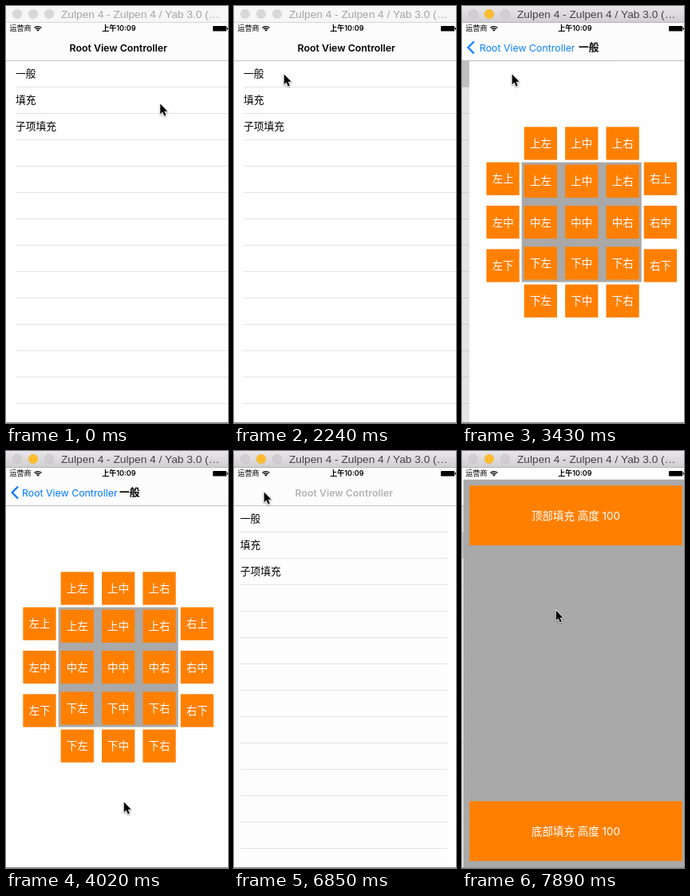
An HTML page with a canvas that plays this animation: 278x522 px, repeating every 8 s.

```html
<!DOCTYPE html>
<html lang="zh-CN">
<head>
<meta charset="utf-8">
<style>
html, body { margin: 0; width: 278px; height: 522px; overflow: hidden; background: #fff; }
canvas { display: block; width: 278px; height: 522px; }
</style>
</head>
<body>
<canvas id="stage"></canvas>
<script>
const W = 278, H = 522, LOOP = 8000, STEP = 148.9;
const SCREEN = { w: 281.25, top: 20.75, bottom: 521, nav: 68 };
const MID = SCREEN.w / 2, ROW = 33;
const SANS = 'Inter, "Noto Sans CJK SC", "Noto Sans CJK", sans-serif';
const TITLE_FONT = '"Liberation Sans", Arial, sans-serif';
const ORANGE = '#ff8000', GRAY = '#a9a9a9', BLUE = '#007aff';
const TAP = { open: 2970, back: 6545, fill: 7435 };

const canvas = document.getElementById('stage');
const dpr = window.devicePixelRatio || 1;
canvas.width = W * dpr;
canvas.height = H * dpr;
const ctx = canvas.getContext('2d');

const START = [192.5, 121];
const moves = [
  { from: 0, to: 890, at: [121, 136], via: [135, 205] },
  { from: 1490, to: 2240, at: [62, 84] },
  { from: 3430, to: 4020, at: [147, 438] },
  { from: 4620, to: 5070, at: [57, 114] },
  { from: 5220, to: 5780, at: [37, 50] },
  { from: 6850, to: 7450, at: [110, 118] },
  { from: 7600, to: 7890, at: [117, 198] }
];

const clamp = v => Math.max(0, Math.min(1, v));
const easeOut = k => 1 - (1 - k) ** 2;
const mix = (a, b, k) => a + (b - a) * k;

function pointerAt(t) {
  let pos = START;
  for (const { from, to, at, via } of moves) {
    if (t < from) break;
    const k = easeOut(clamp((t - from) / (to - from)));
    pos = pos.map((a, i) => via
      ? mix(mix(a, via[i], k), mix(via[i], at[i], k), k)
      : mix(a, at[i], k));
  }
  return pos;
}

// Critically damped slide
function slide(t, start) {
  const u = Math.max(0, t - start) * 0.016;
  const p = 1 - (1 + u) * Math.exp(-u);
  return p > 0.998 ? 1 : p;
}

function rect(x, y, w, h, color) {
  ctx.fillStyle = color;
  ctx.fillRect(x, y, w, h);
}

function shifted(x, paint) {
  ctx.save();
  ctx.translate(x, 0);
  paint();
  ctx.restore();
}

function text(s, x, cy, size, color, { weight = 400, align = 'left', font = SANS, alpha = 1 } = {}) {
  if (alpha <= 0) return;
  ctx.globalAlpha = alpha;
  ctx.font = `${weight} ${size}px ${font}`;
  ctx.textAlign = align;
  ctx.fillStyle = color;
  ctx.fillText(s, x, cy + size * 0.365);
  ctx.globalAlpha = 1;
}

function titleBar(active) {
  const g = ctx.createLinearGradient(0, 0, 0, 20);
  g.addColorStop(0, active ? '#e8e6e8' : '#f6f6f6');
  g.addColorStop(1, active ? '#d1cfd1' : '#f6f6f6');
  rect(0, 0, W, 20, g);
  rect(0, 20, W, 1, active ? '#b4b2b4' : '#d6d6d6');
  for (let i = 0; i < 3; i++) {
    const lit = active && i === 1;
    ctx.beginPath();
    ctx.arc(14 + i * 20, 10, 5.8, 0, 7);
    ctx.fillStyle = lit ? '#fdbd2e' : active ? '#d0ced0' : '#d8d8d8';
    ctx.fill();
    ctx.lineWidth = 0.6;
    ctx.strokeStyle = lit ? '#f0b030' : active ? '#c2c0c2' : '#d4d4d4';
    ctx.stroke();
  }
  text('Zulpen 4 - Zulpen 4 / Yab 3.0 (…', 69, 10, 13.7, active ? '#454345' : '#a4a4a4', { font: TITLE_FONT });
}

function statusBar() {
  text('运营商', 4.5, 28, 9, '#000');
  ctx.strokeStyle = ctx.fillStyle = '#000';
  ctx.lineWidth = 1.3;
  const fan = r => ctx.arc(40, 31.7, r, -Math.PI * 0.76, -Math.PI * 0.24);
  for (const r of [3.7, 6.1]) {
    ctx.beginPath();
    fan(r);
    ctx.stroke();
  }
  ctx.beginPath();
  ctx.moveTo(40, 31.7);
  fan(2.2);
  ctx.fill();
  text('上午10:09', 141.3, 28, 9, '#000', { weight: 600, align: 'center' });
  ctx.beginPath();
  ctx.roundRect(259, 25, 17.2, 6.6, 1.2);
  ctx.fill();
  rect(276.8, 27, 1.2, 2.6, '#000');
}

function chevron(alpha) {
  ctx.globalAlpha = alpha;
  ctx.strokeStyle = BLUE;
  ctx.lineWidth = 2.2;
  ctx.beginPath();
  ctx.moveTo(15, 44.5);
  ctx.lineTo(7.6, 52);
  ctx.lineTo(15, 59.5);
  ctx.stroke();
  ctx.globalAlpha = 1;
}

// p: 0 shows the list title, 1 the detail title
function navBar(p, fade, back) {
  rect(0, SCREEN.top, SCREEN.w, SCREEN.nav - SCREEN.top, '#fcfcfc');
  rect(0, SCREEN.nav, SCREEN.w, 0.8, '#b8b8ba');
  const x = mix(79.5, 20, p), label = 'Root View Controller';
  text(label, x, 52, 12.35, '#000', { weight: 600, alpha: fade });
  chevron(back);
  text(label, x, 52, 12.35, BLUE, { alpha: p > 0.1 ? back : 0 });
  text('一般', mix(267, 142, p), 51.7, 12.75, '#000', { weight: 700, alpha: clamp(p * 1.4 - 0.4) });
}

function list(p, row, glow) {
  rect(0, SCREEN.top, W, H, '#fefefe');
  shifted(-0.3 * SCREEN.w * p, () => {
    rect(0, 68.5 + row * ROW, SCREEN.w, ROW, `rgba(213,213,213,${glow})`);
    ['一般', '填充', '子项填充'].forEach((s, i) => text(s, 12, 84.4 + i * ROW, 12.75, '#000'));
    for (let i = 1; i < 14; i++) rect(12, SCREEN.nav + i * ROW, SCREEN.w, 1, '#e4e4e6');
  });
  rect(0, SCREEN.nav, W, H, `rgba(0,0,0,${p * 0.1})`);
}

function tile(s, x, y) {
  rect(x, y, 41.25, 41.25, ORANGE);
  text(s, x + 20.6, y + 20.6, 13.5, '#fff', { align: 'center' });
}

function gridPage() {
  rect(0, SCREEN.nav + 0.8, SCREEN.w, H, '#fefefe');
  const left = MID - 75, top = 195.6, size = 41.25, gap = 3;
  const before = -gap - size, after = 150 + gap;
  rect(left, top, 150, 150, GRAY);
  const cols = ['左', '中', '右'], rows = ['上', '中', '下'];
  const inner = i => gap + i * (75 - gap - size / 2);
  const outer = i => i * (75 - size / 2);
  for (let i = 0; i < 3; i++) {
    for (let j = 0; j < 3; j++) tile(rows[j] + cols[i], left + inner(i), top + inner(j));
    tile('上' + cols[i], left + inner(i), top + before);
    tile('下' + cols[i], left + inner(i), top + after);
    tile('左' + rows[i], left + before, top + outer(i));
    tile('右' + rows[i], left + after, top + outer(i));
  }
}

function fillPage() {
  rect(0, SCREEN.top, SCREEN.w, 15, '#fefefe');
  rect(0, 35.75, SCREEN.w, H, GRAY);
  const block = (s, y) => {
    rect(7.5, y, SCREEN.w - 15, 75, ORANGE);
    text(s + '填充 高度 100', MID, y + 37.5, 13.5, '#fff', { align: 'center' });
  };
  block('顶部', 43.2);
  block('底部', 438.3);
}

function edgeShadow(x, top, alpha) {
  const g = ctx.createLinearGradient(x - 5, 0, x, 0);
  g.addColorStop(0, 'rgba(0,0,0,0)');
  g.addColorStop(1, `rgba(0,0,0,${alpha})`);
  rect(x - 5, top, 5, H, g);
}

function pointer(x, y) {
  ctx.save();
  ctx.translate(x + 0.7, y + 1.4);
  ctx.scale(0.9, 0.9);
  ctx.beginPath();
  [[0, 0], [0, 14.2], [3.2, 11.3], [5.6, 16.8], [7.9, 15.8], [5.6, 10.4], [10, 10.4]]
    .forEach(q => ctx.lineTo(...q));
  ctx.closePath();
  ctx.lineJoin = 'round';
  ctx.lineWidth = 1.8;
  ctx.strokeStyle = '#fff';
  ctx.shadowColor = 'rgba(0,0,0,0.4)';
  ctx.shadowBlur = 2 * dpr;
  ctx.shadowOffsetY = dpr;
  ctx.stroke();
  ctx.shadowColor = 'transparent';
  ctx.fillStyle = '#000';
  ctx.fill();
  ctx.restore();
}

function draw(now) {
  const t = Math.floor((now % LOOP + 8) / STEP) * STEP;
  ctx.setTransform(dpr, 0, 0, dpr, 0, 0);

  const push = slide(t, TAP.open + 126), pop = slide(t, TAP.back + 7), fill = slide(t, TAP.fill + 11);
  const active = t >= TAP.open, popping = t >= TAP.back, second = t >= TAP.fill;
  const p = popping ? 1 - pop : push;
  const glow = second ? 1 : popping ? clamp(1 - pop * 1.1) : +active;

  list(second ? fill : p, +second, glow);
  if (p > 0) {
    const x = SCREEN.w * (1 - p);
    if (!popping) edgeShadow(x, SCREEN.nav, 0.2 * (1 - p));
    shifted(x, gridPage);
  }
  const fade = popping ? clamp((pop - 0.93) * 14) : clamp(1 - 3 * p);
  const back = p ** 1.5 * (popping ? 0.4 : 1);
  shifted(-SCREEN.w * fill, () => navBar(p, fade, back));
  if (fill > 0) {
    const x = SCREEN.w * (1 - fill);
    edgeShadow(x, SCREEN.top, 0.2 * (1 - fill));
    shifted(x, fillPage);
  }
  statusBar();
  rect(0, SCREEN.bottom, W, 1, '#8e8e8e');
  titleBar(active);
  pointer(...pointerAt(t));
}

let origin;
function loop(now) {
  origin ??= now;
  draw(now - origin);
  requestAnimationFrame(loop);
}
draw(0);
requestAnimationFrame(loop);
</script>
</body>
</html>
```
